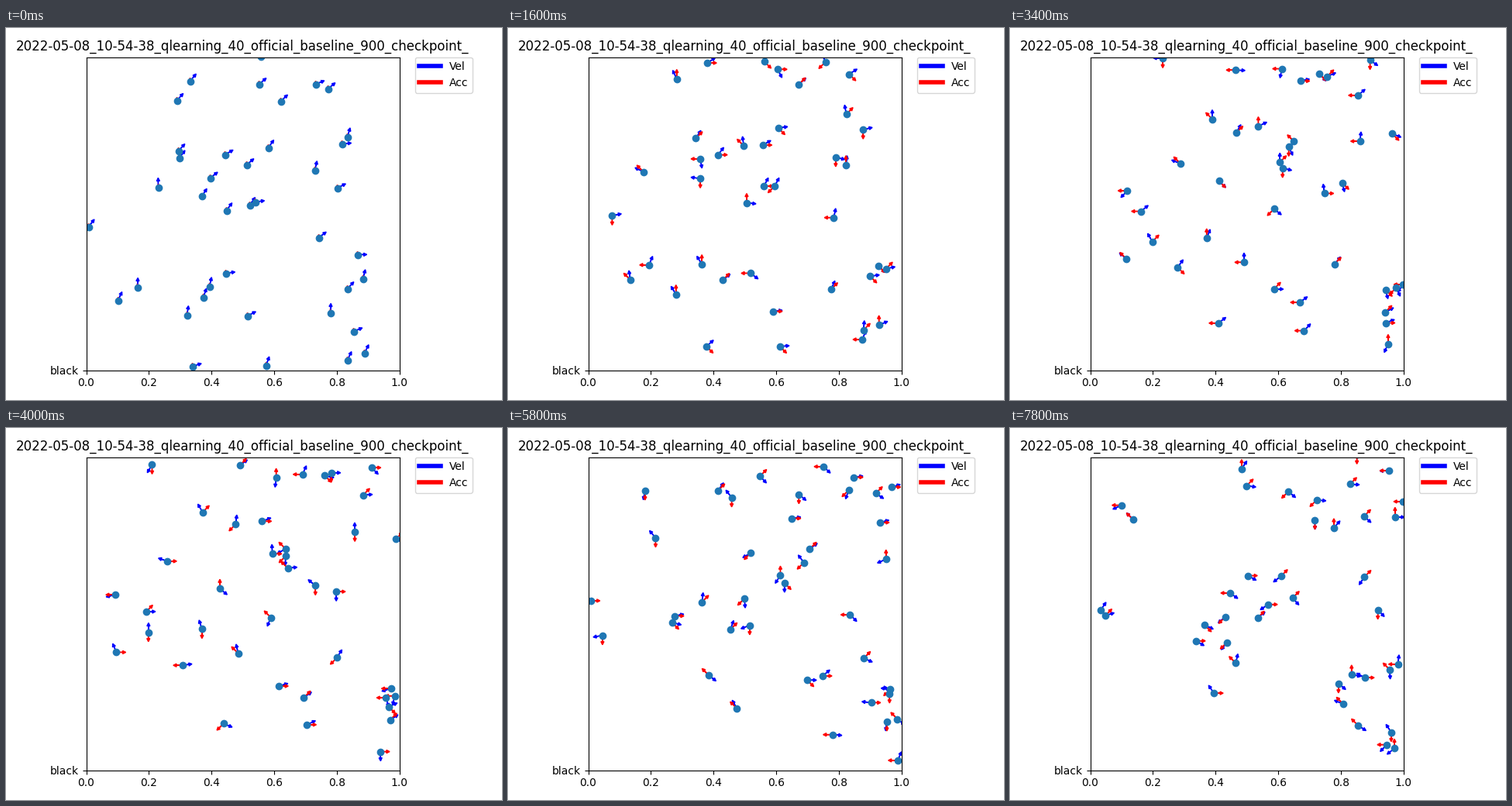
These frames come from a looping animation (640x480 px, 8 s). A matplotlib script:

```python
import numpy as np
import matplotlib.pyplot as plt
from matplotlib.animation import FuncAnimation
from matplotlib.lines import Line2D

W, H, DPI = 640, 480, 100
LEFT, BOTTOM, SIDE = 103, 441, 404      # plot box in pixels
STEPS, INTERVAL = 40, 200
SPEED, TURN = 0.01, 0.5
BODY, HEAD = 0.02, 0.01

# x, y in pixels and heading in degrees at the start
START = np.array([
    (237, 68, 50), (220, 93, 48), (328, 36, 60), (326, 72, 40),
    (399, 72, 22), (415, 78, 40), (354, 94, 43), (440, 140, 73),
    (433, 149, 5), (338, 154, 55), (222, 158, 47), (223, 167, 52),
    (282, 163, 30), (310, 176, 40), (398, 183, 77), (263, 193, 38),
    (196, 205, 91), (427, 206, 27), (252, 217, 57), (284, 235, 54),
    (314, 228, 55), (321, 224, 8), (106, 256, 52), (403, 270, 37),
    (453, 292, 1), (283, 316, 8), (460, 323, 75), (440, 336, 47),
    (262, 333, 77), (254, 347, 70), (169, 334, 87), (144, 351, 65),
    (233, 370, 81), (311, 371, 27), (418, 367, 87), (448, 391, 22),
    (462, 419, 63), (440, 428, 64), (335, 435, 70), (240, 436, 17),
])


def unit(angle):
    return np.column_stack([np.cos(angle), np.sin(angle)])


def normed(v):
    return v / np.linalg.norm(v, axis=1, keepdims=True)


def simulate():
    """Agents of constant speed, pushed each step in one of eight directions."""
    rng = np.random.default_rng(40)
    pos = np.column_stack([START[:, 0] - LEFT, BOTTOM - START[:, 1]]) / SIDE
    vel = unit(np.radians(START[:, 2]))
    states = [(pos, vel, np.zeros_like(vel))]
    for _ in range(STEPS - 1):
        acc = unit(rng.integers(0, 8, len(pos)) * np.pi / 4)
        # near a wall the push points back inside
        inward = (pos < 0.02).astype(float) - (pos > 0.98)
        near = inward.any(axis=1)
        acc[near] = normed(inward[near])
        vel = normed(vel + TURN * acc)
        pos = np.clip(pos + SPEED * vel, -0.008, 1.008)
        states.append((pos, vel, acc))
    return states


states = simulate()

fig = plt.figure(figsize=(W / DPI, H / DPI), dpi=DPI)
ax = fig.add_axes([(LEFT + 0.5) / W, (H - BOTTOM - 0.5) / H, SIDE / W, SIDE / H])
ax.set_xlim(0, 1)
ax.set_ylim(0, 1)
ax.set_xticks(np.linspace(0, 1, 6))
ax.set_yticks([0], ["black"])
ax.set_title("2022-05-08_10-54-38_qlearning_40_official_baseline_900_checkpoint_")
ax.legend([Line2D([0], [0], color=c, lw=4) for c in ("blue", "red")],
          ["Vel", "Acc"], bbox_to_anchor=(1.05, 1), loc="upper left",
          borderaxespad=0)
dots, = ax.plot([], [], "o", color="#1f77b4")
arrows = []


def add_arrow(start, direction, color):
    arrows.append(ax.arrow(*start, *(BODY * direction), color=color,
                           head_width=HEAD, head_length=HEAD))


def draw(i):
    while arrows:
        arrows.pop().remove()
    pos, vel, acc = states[i]
    for p, v, a in zip(pos, vel, acc):
        add_arrow(p, v, "blue")
        add_arrow(p, a, "red")
    dots.set_data(pos[:, 0], pos[:, 1])
    return [dots, *arrows]


def reset():
    return draw(0)


anim = FuncAnimation(fig, draw, frames=STEPS, init_func=reset,
                     interval=INTERVAL, repeat=True, repeat_delay=0)
plt.show()
```
